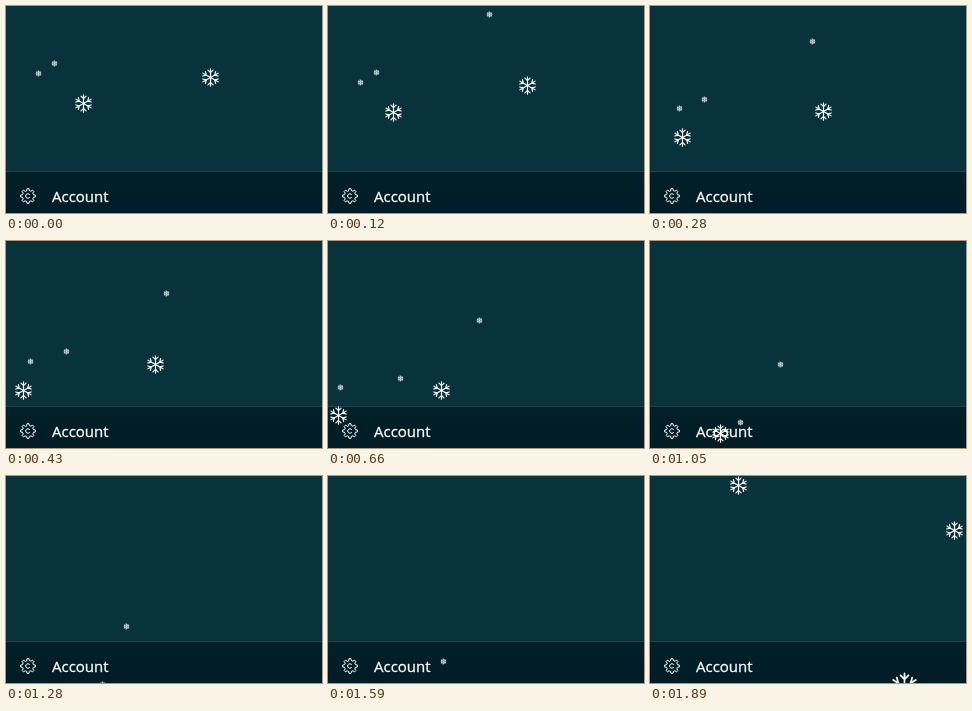
These frames come from a looping animation (316 by 207 pixels, 1.97 s). An HTML page:

```html
<!DOCTYPE html>
<html lang="en">
<head>
<meta charset="utf-8">
<title>Snow over account menu</title>
<style>
  html, body { margin: 0; width: 100%; height: 100%; overflow: hidden; background: #08333c; }
  svg { display: block; }
  .label { font: 15px "Open Sans", "Noto Sans", sans-serif; fill: #fff; stroke: #fff; stroke-width: 0.3; }
  .line { fill: none; stroke: #fff; stroke-linejoin: round; stroke-linecap: round; }
</style>
</head>
<body>
<svg width="316" height="207" viewBox="0 0 316 207">
  <defs>
    <linearGradient id="bar" x2="0" y2="1">
      <stop stop-color="#022029"/>
      <stop offset="1" stop-color="#011c26"/>
    </linearGradient>
    <path id="arm" d="M0 0V-8.7M-2.6-7.4L0-4.8L2.6-7.4"/>
    <g id="flake"></g>
  </defs>
  <rect width="316" height="207" fill="#08333c"/>
  <rect y="165" width="316" height="42" fill="url(#bar)"/>
  <rect y="165" width="316" height="1" fill="#1d434d"/>
  <g class="line" transform="translate(22 190)" stroke-width="1">
    <path id="gear"/>
    <path d="M1.5-1.7A2.3 2.3 0 1 0 1.5 1.7"/>
  </g>
  <text class="label" x="46" y="196">Account</text>
  <g id="snow" class="line"></g>
</svg>
<script>
const LOOP = 1970, LAST = 25, SWAY = 0.175;
const BIG = { scale: 1, width: 1.15, reach: 71 };
const SMALL = { scale: 0.3, width: 2.4, reach: 24, opacity: 0.85 };
const HUGE = { scale: 1.5, width: 1.15, reach: 71 };

// x swings around mid, peaking at step peak; y falls evenly from top
const flakes = [
  { ...BIG, mid: 80.5, peak: -9.25, top: 97, fall: 8.6 },
  { ...BIG, mid: 137.3, peak: -2, top: 70.5, fall: 8.7 },
  { ...SMALL, mid: 8.4, peak: 1, top: 67.3, fall: 8.75 },
  { ...SMALL, mid: 72, peak: 17.95, top: 57.3, fall: 8.85 },
  { ...SMALL, mid: 138.8, peak: 3, top: -0.8, fall: 8.85, from: 1 },
  { ...BIG, mid: 242.6, peak: 22, top: -163.5, fall: 8.7, from: 22 },
  { ...BIG, mid: 17, peak: 25, top: -208.5, fall: 8.7 },
  { ...HUGE, mid: 183, peak: 25, top: -7, fall: 8.7, from: 22 }
];

const byId = id => document.getElementById(id);

function add(parent, name, attrs) {
  const el = document.createElementNS("http://www.w3.org/2000/svg", name);
  for (const key in attrs) el.setAttribute(key, attrs[key]);
  return parent.appendChild(el);
}

function gearPath(teeth) {
  const points = [];
  for (let n = 0; n < teeth; n++) {
    for (const [turn, r] of [[-0.3, 5.6], [-0.17, 7.4], [0.17, 7.4], [0.3, 5.6]]) {
      const a = (n + turn) / teeth * 2 * Math.PI;
      points.push((r * Math.sin(a)).toFixed(2) + " " + (-r * Math.cos(a)).toFixed(2));
    }
  }
  return "M" + points.join("L") + "Z";
}

byId("gear").setAttribute("d", gearPath(8));
for (let a = 0; a < 360; a += 60) {
  add(byId("flake"), "use", { href: "#arm", transform: `rotate(${a})` });
}
for (const f of flakes) {
  f.el = add(byId("snow"), "use", {
    href: "#flake", "stroke-width": f.width, opacity: f.opacity || 1
  });
}

// The snow advances in held steps, slightly quicker at the start
function stepAt(t) {
  const step = t < 280 ? t / 70 : 4 + (t - 274) / 76.8;
  return Math.min(LAST, Math.floor(step));
}

// Centre a flake on a whole pixel
const snap = v => Math.round(v) + 0.5;

function draw(now) {
  const i = stepAt(now % LOOP);
  for (const f of flakes) {
    const x = snap(f.mid + f.reach * Math.cos(SWAY * (i - f.peak)));
    const y = snap(f.top + f.fall * i);
    f.el.setAttribute("visibility", i < (f.from || 0) ? "hidden" : "visible");
    f.el.setAttribute("transform", `translate(${x} ${y}) scale(${f.scale})`);
  }
}

const start = performance.now();
function tick() {
  draw(performance.now() - start);
  requestAnimationFrame(tick);
}
tick();
</script>
</body>
</html>
```
